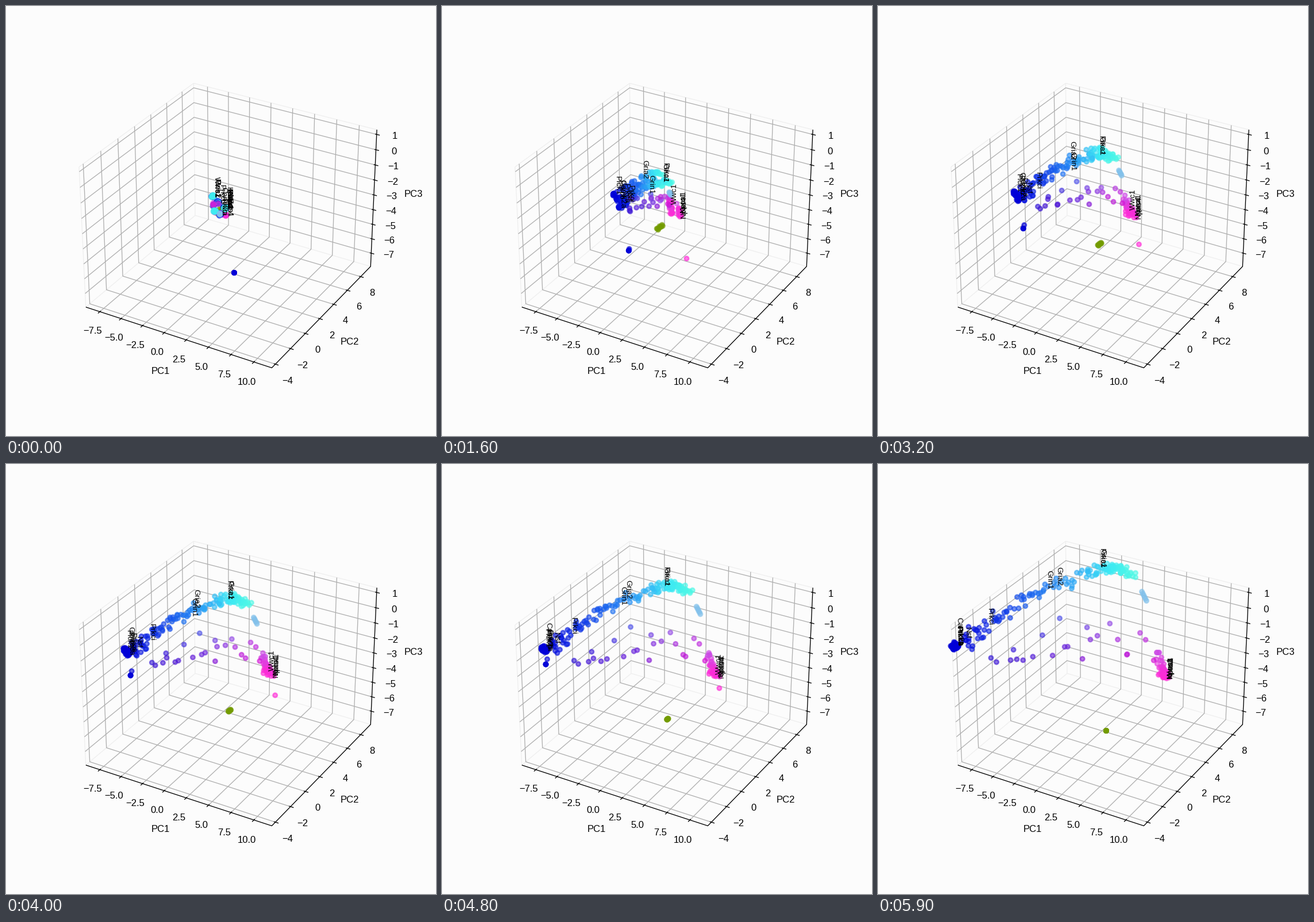
A matplotlib script that plays this animation: 748x748 px, repeating every 6000 ms.

```python
import numpy as np
import matplotlib.pyplot as plt
from matplotlib.animation import FuncAnimation
from matplotlib.collections import LineCollection

SIZE, DPI, FRAMES = 748, 88, 60
PT = 72 / DPI  # points per pixel
rng = np.random.default_rng(4)
plt.rcParams["font.family"] = "Liberation Sans"

fig = plt.figure(figsize=(SIZE / DPI, SIZE / DPI), dpi=DPI, facecolor="#fcfcfc")
ax = fig.add_axes([0, 0, 1, 1])
ax.set(xlim=(0, SIZE), ylim=(SIZE, 0))
ax.axis("off")


# ---- perspective box -------------------------------------------------

def project(p):
    """Box fractions (0..1 per axis) to stage pixels; elev 30, azim -60."""
    x, y, z = (np.array(p) - 0.5) * (1.19048, 1.19048, 0.89286)
    right = 0.86603 * x + 0.5 * y
    up = -0.25 * x + 0.43301 * y + 0.86603 * z
    depth = 10 - (0.43301 * x - 0.75 * y + 0.5 * z)
    return 391.1 + 3113.3 * right / depth, 370 - 3113.3 * up / depth


def add_lines(paths, color):
    lines = [[project(p) for p in path] for path in paths]
    ax.add_collection(LineCollection(lines, colors=color, linewidths=1.33 * PT, zorder=1))


def write(point, s, va):
    s = s.replace("-", "\u2212")
    ax.text(*project(point), s, fontsize=16.67 * PT, ha="center", va=va)


# per axis: ticks, lower limit, range, format, and a point at fraction f
# along the axis, pushed outwards by d (tick direction) and e (the other)
AXES = [
    (np.arange(-7.5, 10.1, 2.5), -9.174, 21.11, "{:.1f}", lambda f, d, e: (f, -d, -e)),
    (np.arange(-4, 9, 2), -4.465, 13.99, "{:d}", lambda f, d, e: (1 + d, f, -e)),
    (np.arange(-7, 2), -7.931, 9.236, "{:d}", lambda f, d, e: (1 + d, 1 + e, f)),
]
GRID = [
    lambda f: [(f, 0, 0), (f, 1, 0), (f, 1, 1)],
    lambda f: [(1, f, 0), (0, f, 0), (0, f, 1)],
    lambda f: [(0, 0, f), (0, 1, f), (1, 1, f)],
]
TICK_PAD, NAME_PAD = 0.064, 0.142

add_lines([[(0, 0, 1), (0, 1, 1), (1, 1, 1)], [(0, 1, 1), (0, 1, 0)],
           [(0, 0, 0), (0, 1, 0), (1, 1, 0)], [(0, 0, 0), (0, 0, 1)]], "#efefef")
marks = [[(0, 0, 0), (1, 0, 0), (1, 1, 0), (1, 1, 1)]]
for n, ((ticks, low, span, fmt, place), grid) in enumerate(zip(AXES, GRID), 1):
    fractions = (ticks - low) / span
    add_lines([grid(f) for f in fractions], "#b0b0b0")
    marks += [[place(f, -0.008, 0), place(f, 0.016, 0)] for f in fractions]
    for value, f in zip(ticks, fractions):
        write(place(f, TICK_PAD, TICK_PAD), fmt.format(value), "top")
    write(place(0.5, NAME_PAD, NAME_PAD), f"PC{n}", "center")
add_lines(marks, "black")

# ---- points: each travels straight from a start spot to its end --------

SPOTS = np.array([(360, 331), (369, 342), (361, 346), (363, 357),
                  (372, 362), (382, 364), (381, 351)], float)
FRONT = (397, 464)
BLUE, PINK, OLIVE, PALE = (0, 0, 215), (255, 42, 215), (115, 155, 0), (130, 193, 235)
starts, ends, colors = [], [], []


def add_points(start, x, y, color):
    end = np.column_stack([x, y])
    starts.append(np.broadcast_to(np.array(start, float), end.shape))
    ends.append(end)
    colors.append(np.broadcast_to(np.array(color, float) / 255, (len(end), 3)))


def from_spots(choice, n):
    return SPOTS[rng.choice(choice, n)] + rng.normal(0, 1.1, (n, 2))


def ramp(v, stops, rgb):
    return np.stack([np.interp(v, stops, c) for c in zip(*rgb)], axis=-1)


def curve_y(x):
    """Ridge of the long arc from the blue corner to the cyan tip."""
    return np.interp(x, [132, 185, 220, 265, 310, 380, 415, 449],
                     [317, 286, 263, 231, 214, 184, 179, 196])


def curve_color(x):
    return ramp(x, [132, 170, 240, 310, 360, 400, 440],
                [BLUE, (8, 22, 225), (20, 75, 235), (35, 140, 245),
                 (50, 185, 245), (60, 232, 245), (78, 248, 230)])


# olive group, gathering into one place
along = np.linspace(-1, 1, 10)
add_points(np.column_stack([372 + 7 * along, 356 - 4 * along + rng.normal(0, 2, 10)]),
           [FRONT[0]] * 10, [FRONT[1]] * 10, OLIVE)

# magenta group, thinning out upwards
rise = np.clip(rng.exponential(13, 48), 0, 44)
add_points(from_spots([0, 2, 3, 5, 6], 48),
           500 - 0.35 * rise + rng.normal(0, 3.5, 48), 372 - rise,
           ramp(-rise, [-44, -20, -4], [(205, 75, 230), (235, 55, 220), PINK]))
add_points(FRONT, 502, 373, PINK)

# dark blue cluster with its stragglers
add_points(from_spots([0, 1, 1, 4, 6, 6], 75),
           rng.normal(134, 3.1, 75), rng.normal(317, 2.6, 75), BLUE)
add_points(FRONT, [131] * 4 + [134], [322] * 4 + [311], BLUE)

# blue tail, widest near the cluster
x = 148 + 227 * np.linspace(0, 1, 78) ** 1.3 + rng.normal(0, 3, 78)
spread = np.interp(x, [148, 185, 240, 375], [6, 14, 8, 6])
add_points(from_spots([0, 1, 3, 4, 6], 78),
           x, curve_y(x) + spread * rng.normal(0, 1, 78), curve_color(x))

# sparse violet points in the hollow of the arc
x = np.linspace(194, 480, 23) + rng.normal(0, 6, 23)
half = np.interp(x, [194, 270, 350, 400, 480], [6, 20, 62, 45, 22])
y = np.interp(x, [194, 350, 480], [340, 305, 325]) + half * rng.uniform(-1, 1, 23)
red = np.interp(x, [190, 270, 340, 420, 480], [45, 75, 115, 180, 205]) + 0.4 * (y - 320)
green = np.interp(y, [234, 280, 320, 366], [110, 75, 35, 10])
blue = np.interp(y, [234, 366], [240, 208])
add_points(from_spots([0, 1, 2, 3, 4, 6], 23), x, y, np.column_stack([red, green, blue]))

# cyan crest and the pale group past its end
x = np.clip(rng.normal(409, 20, 70), 365, 448)
add_points(from_spots([0, 3, 6], 70), x, curve_y(x) + rng.normal(0, 4.5, 70), curve_color(x))
step = np.linspace(0, 1, 6)
add_points(from_spots([4], 6), 459 + 8 * step, 222 + 16 * step, PALE)

starts, ends, colors = map(np.vstack, (starts, ends, colors))
dots = ax.scatter(*starts.T, s=(7.45 * PT) ** 2, c=colors, alpha=0.6,
                  linewidths=2.5 * PT, edgecolors="face", zorder=3)

# ---- vertical labels: name, start spot, end ----------------------------


def on_curve(x):
    return x, curve_y(x) - 6


CORNER, TIP = (134, 314), (503, 370)
LABELS = [
    ("Pick1", 0, CORNER), ("Camk2a", 4, CORNER), ("Prkca", 6, CORNER), ("Prkcb", 1, CORNER),
    ("Nsf", 6, on_curve(149)), ("Prkci", 4, on_curve(188)),
    ("Grin1", 5, on_curve(291)), ("Gria2", 0, on_curve(308)),
    ("Gria1", 6, on_curve(384)), ("Prkcz", 6, on_curve(383)),
    ("Wwc1", 0, TIP), ("Npas4", 5, TIP), ("Kpna1", 6, TIP), ("Neto1", 6, TIP),
]
texts = [ax.text(0, 0, name, fontsize=13.33 * PT, zorder=4) for name, _, _ in LABELS]


def draw(i):
    t = i / (FRAMES - 1)
    dots.set_offsets((1 - t) * starts + t * ends)
    for text, (_, spot, end) in zip(texts, LABELS):
        x, y = (1 - t) * SPOTS[spot] + t * np.array(end)
        # lean with the box's uprights, flipping at the centre line
        angle = 90 - 2.6 * (x - 391) / 250
        text.set_position((x, y))
        text.set_rotation(angle - 180 if angle > 90 else angle)
    return [dots, *texts]


anim = FuncAnimation(fig, draw, frames=FRAMES, interval=100, repeat=True, repeat_delay=0)
plt.show()
```
